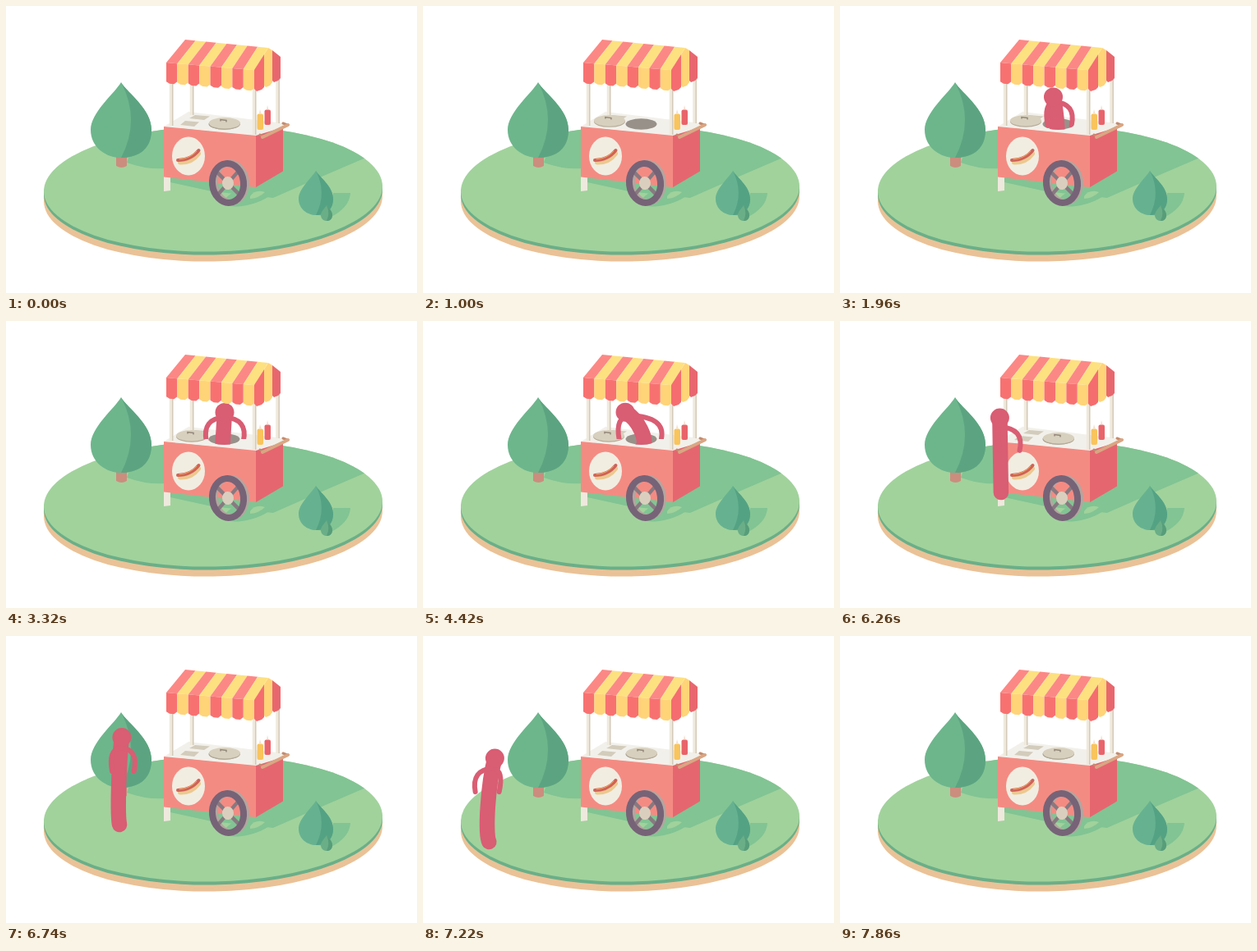
These frames come from a looping animation (500x350 px, 9060 ms). An HTML page:

```html
<!DOCTYPE html>
<html lang="en">
<head>
<meta charset="utf-8">
<title>Hot dog cart</title>
<style>
  html, body { margin: 0; width: 100%; height: 100%; overflow: hidden; background: #fff; }
  svg { display: block; width: 100%; height: 100%; }
</style>
</head>
<body>
<svg viewBox="0 0 500 350">
  <defs>
    <ellipse id="disc" cx="252" cy="223" rx="206" ry="76.5" transform="rotate(-1 252 223)"/>
    <clipPath id="onDisc"><use href="#disc"/></clipPath>
    <clipPath id="inHole"><path d="M150 60H350V144H285A19.5 7 0 0 1 246 144H150Z"/></clipPath>
  </defs>

  <!-- ground -->
  <g fill="#eac297"><use href="#disc" y="12"/><use href="#disc" y="8"/></g>
  <use href="#disc" y="4" fill="#6aaf88"/>
  <use href="#disc" fill="#a1d29c"/>
  <g clip-path="url(#onDisc)" fill="#82c493">
    <path d="M320 140H410L440 184 375 212 325 234 250 226 200 215V200H320Z"/>
    <path d="M147 191Q172 200 194 198V140H165Z"/>
    <ellipse cx="296" cy="231" rx="31" ry="11" transform="rotate(-16 296 231)"/>
    <path d="M380 255Q398 248 398 228H419Q418 246 394 258Z"/>
  </g>
  <path d="M297 232Q303 223 315 227 308 234 297 235Z" fill="#a1d29c"/>

  <path d="M134 180h13v15q-6.5 4-13 0Z" fill="#cb8d7e"/>
  <g id="trees"></g>

  <!-- cart -->
  <path d="M192 207h8v18l-8 1Z" fill="#eee9dd"/>
  <path d="M192 147L222 129 337 143V149L304 159Z" fill="#f2f0ea"/>
  <path d="M230 133l18 1.5-7 4.500-18-2ZM218 140l17 1.500-6 5.500-17-2Z" fill="#d3ccbc"/>
  <path d="M192 147L304 158V221L192 208.500Z" fill="#f48b83"/>
  <path d="M304 158L337 148V201.500L304 221Z" fill="#e6666f"/>
  <g id="posts"></g>
  <rect x="305.5" y="131.500" width="7.500" height="19.500" rx="2" fill="#f9c45c"/>
  <rect x="314.5" y="126.500" width="7.500" height="18.500" rx="2" fill="#e8646a"/>
  <path d="M308 131l1-5 1.500 5ZM317 126l1-5 1.500 5Z" fill="#f4dfd0"/>
  <g stroke-linecap="round">
    <path d="M309 157l4 2M337 143l5 2" stroke="#c48b6d" stroke-width="3"/>
    <path d="M312 160L343 145" stroke="#d9a683" stroke-width="4"/>
  </g>

  <!-- badge -->
  <ellipse cx="222" cy="183" rx="20" ry="23.5" fill="#f1ede1"/>
  <g fill="none" stroke-linecap="round">
    <path d="M212 190.500Q226 191 234 180" stroke="#ecc88f" stroke-width="6"/>
    <path d="M209 188Q225 188 234.500 176" stroke="#cf6258" stroke-width="4"/>
    <path d="M211 187Q224 186 232 177" stroke="#f0ab62" stroke-width="1"/>
  </g>

  <!-- wheel -->
  <g fill="none" transform="rotate(-6 270 216)">
    <ellipse cx="273.5" cy="215.500" rx="19" ry="24" stroke="#b3a69f" stroke-width="7"/>
    <path d="M258 201L282 231M284 203L256 229" stroke="#887980" stroke-width="4.500"/>
    <ellipse cx="270" cy="216" rx="19" ry="24" stroke="#776377" stroke-width="8"/>
    <ellipse cx="270" cy="216" rx="7" ry="8" fill="#dacfbe"/>
  </g>

  <!-- hatch and lid -->
  <ellipse cx="265.5" cy="144" rx="19" ry="6.800" fill="#98918a"/>
  <g id="lid">
    <ellipse cx="266" cy="144" rx="19" ry="6.800" fill="#b5ab99"/>
    <ellipse cx="266" cy="142.800" rx="19" ry="6.800" fill="#d8d0be"/>
    <path d="M261 140.500V138.500L268 139.500V141.500" fill="none" stroke="#93887a" stroke-width="1.500"/>
  </g>

  <g id="figure" fill="none" stroke="#d95d73" stroke-linecap="round">
    <path id="spine"/><path id="arms"/><path id="head"/>
  </g>

  <g id="canopy"></g>
</svg>
<script>
const $ = id => document.getElementById(id);
const LOOP = 9060;
const lerp = (a, b, u) => a + (b - a) * u;
const smooth = u => u * u * (3 - 2 * u);
const progress = (t, from, to) => Math.min(1, Math.max(0, (t - from) / (to - from)));

// Leaf crown: a full drop plus its shaded right half
function drop(x, top, w, h, light, dark) {
  const right = `C${x + w * .22} ${top + h * .15} ${x + w} ${top + h * .35} ${x + w} ${top + h * .63}` +
    `S${x + w * .5} ${top + h} ${x} ${top + h}`;
  const left = `S${x - w} ${top + h * .86} ${x - w} ${top + h * .63}` +
    `S${x - w * .22} ${top + h * .15} ${x} ${top}Z`;
  const fold = `Q${x + w * .65} ${top + h * .5} ${x} ${top}Z`;
  return `<path d="M${x} ${top}${right}${left}" fill="${light}"/>` +
    `<path d="M${x} ${top}${right}${fold}" fill="${dark}"/>`;
}
$('trees').innerHTML =
  drop(140, 93, 37, 92, '#6db68c', '#5ca481') +
  drop(377, 201, 21, 54, '#66b290', '#54a284') +
  drop(390, 243, 7, 19, '#6aae87', '#579d7a');

function post(x, top, bottom) {
  return `<path d="M${x} ${top}V${bottom}" stroke="#efe9dd" stroke-width="4.500"/>` +
    `<path d="M${x + 1.7} ${top}V${bottom}" stroke="#d3cab9" stroke-width="1.500"/>`;
}
$('posts').innerHTML = post(226, 95, 133) + post(330.5, 85, 143) + post(201, 88, 146) + post(302, 98, 157);

function drawCanopy() {
  const poly = (d, color) => `<path d="${d}" fill="${color}"/>`;
  const roof = ['#fc8885', '#fde180'], valance = ['#f87171', '#ffd479'];
  let out = '';
  for (let i = 0; i < 8; i++) {
    const x = 195 + i * 13.4, y = 69 + i * 1.15;
    const ridgeX = 218 + i * 12.6, ridgeY = 41 + i * 1.25;
    out += poly(`M${x} ${y}L${ridgeX} ${ridgeY}l12.6 1.25L${x + 13.4} ${y + 1.15}Z`, roof[i % 2]);
    out += poly(`M${x} ${y}l13.4 1.15v22l-4 3 -5.4 -.5 -4 -2.500Z`, valance[i % 2]);
  }
  return out +
    poly('M302 78L314 59V99L311 102 305 104 302 101Z', '#f56d6f') +
    poly('M314 59L319 51 324 54V93L321 97 316 99 314 97Z', '#ffd479') +
    poly('M324 54L334 62V88L331 91 326 93 324 91Z', '#e8676e');
}
$('canopy').innerHTML = drawCanopy();

// Poses: head and tail points, sideways bend of the spine, horizontal reach of each hand
const up = { at: 1960, until: 2360, head: [259.5, 111], tail: [264, 160], bend: 2, arms: [-8, 21] };
const look = { at: 2880, until: 3080, head: [266, 111.5], tail: [263, 160], bend: 0, arms: [-22, 18] };
const poses = [
  { ...up, at: 1120, head: [259.5, 164], tail: [264, 213] },
  up,
  look,
  { ...look, at: 3640, until: 3940, arms: [-22, 31] },
  { at: 4820, head: [231, 111], tail: [270, 150], bend: 18, arms: [-6, 44] },
  { at: 5260, head: [212, 125], tail: [290, 140], bend: 25, arms: [14, 14] },
  { at: 5780, head: [208, 110], tail: [258, 134], bend: 12, arms: [0, 20] },
  { at: 6260, head: [194.5, 118], tail: [196, 209], bend: 0, arms: [0, 24] },
  { at: 7220, head: [87.5, 149], tail: [80.5, 251], bend: -6, arms: [-21, 8] },
  { at: 7580, head: [48, 185], tail: [38, 281], bend: -4, arms: [-20, 10] },
  { at: 7860, head: [20, 324], tail: [20, 330], bend: 0, arms: [0, 0] }
];

function poseAt(t) {
  const next = poses.findIndex(p => p.at > t);
  const a = poses[next - 1], b = poses[next];
  let u = progress(t, a.until ?? a.at, b.at);
  if (b.at <= 4820) u = smooth(u);
  const mix = key => a[key].map((v, i) => lerp(v, b[key][i], u));
  return { head: mix('head'), tail: mix('tail'), arms: mix('arms'), bend: lerp(a.bend, b.bend, u) };
}

function drawFigure(t) {
  const size = 1 - progress(t, 7580, 7860);
  const visible = t > 1120 && size > .05;
  $('figure').style.display = visible ? '' : 'none';
  if (!visible) return;
  $('figure').setAttribute('clip-path', t < 5100 ? 'url(#inHole)' : 'none');

  const { head, tail, bend, arms } = poseAt(t);
  head[1] -= 10 * Math.sin(Math.PI * progress(t, 6260, 7220)) ** 2;
  const dx = tail[0] - head[0], dy = tail[1] - head[1], length = Math.hypot(dx, dy);
  const along = u => [head[0] + dx * u + dy / length * bend, head[1] + dy * u - dx / length * bend];
  const c1 = along(.3), c2 = along(.9);
  // Point on the spine near its start
  const s = .12, r = 1 - s;
  const [sx, sy] = head.map((v, k) =>
    r ** 3 * v + 3 * r * r * s * c1[k] + 3 * r * s * s * c2[k] + s ** 3 * tail[k]);

  const stroke = (id, d, width) => {
    $(id).setAttribute('d', d);
    $(id).setAttribute('stroke-width', width * size);
  };
  stroke('spine', `M${head}C${c1} ${c2} ${tail}`, 18.5);
  stroke('head', `M${head}h.01`, 23);
  stroke('arms', arms.map((reach, i) => {
    const hand = sx + reach * size, elbow = hand + (i ? 6 : -5) * size;
    return `M${sx} ${sy}Q${elbow} ${sy + 2 * size} ${hand} ${sy + 29 * size}`;
  }).join(''), 6);
}

function draw(t) {
  const slide = smooth(progress(t, 200, 1080)) - progress(t, 4900, 5500);
  $('lid').setAttribute('transform', `translate(${-40 * slide} ${-3 * slide})`);
  drawFigure(t);
}

const start = performance.now();
function tick() {
  draw((performance.now() - start) % LOOP);
  requestAnimationFrame(tick);
}
tick();
</script>
</body>
</html>
```
